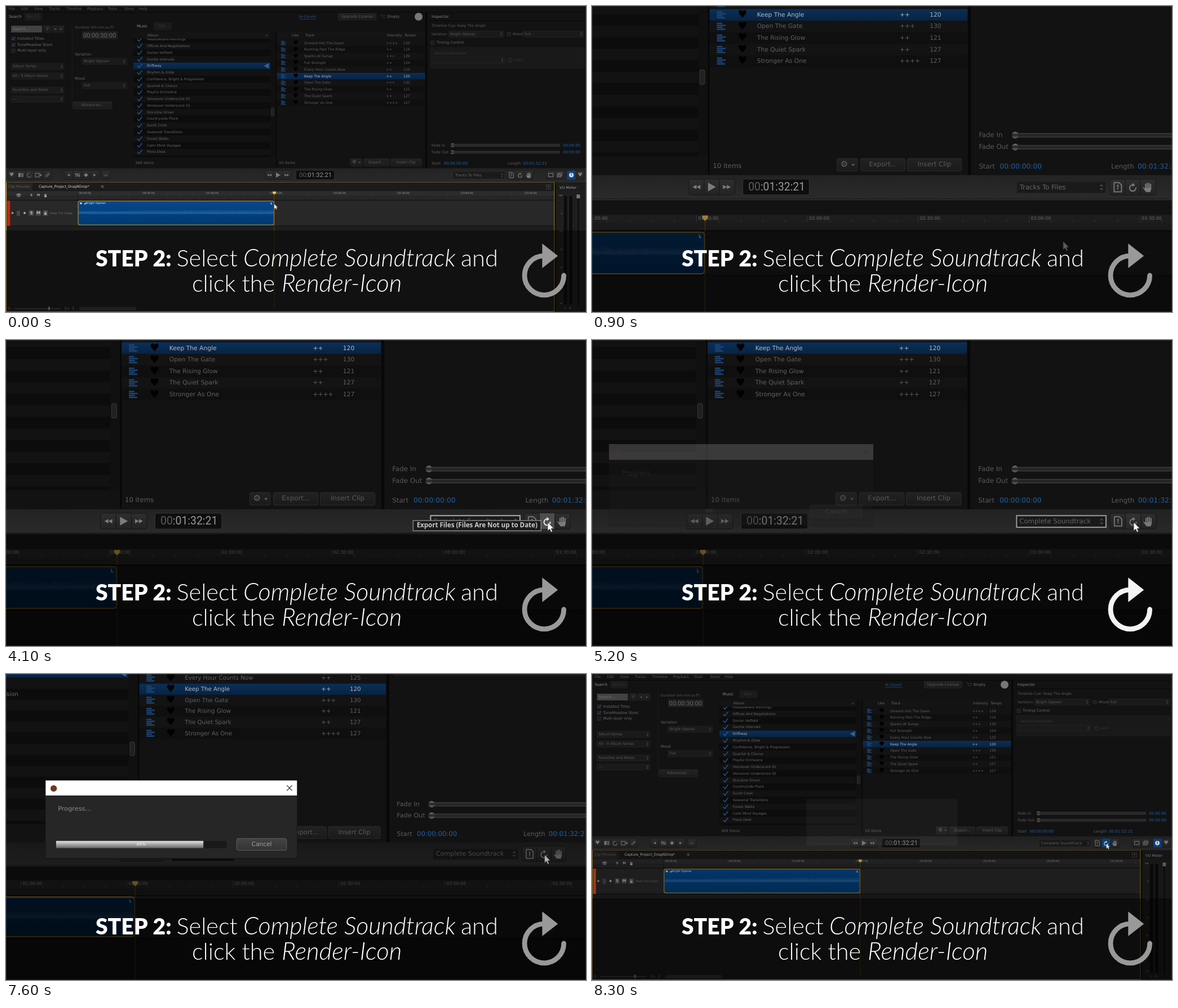
An HTML page with a canvas that plays this animation: 1029x544 px, repeating every 8.4 s.

```html
<!DOCTYPE html>
<html lang="en">
<head>
<meta charset="utf-8">
<title>Step 2: render the soundtrack</title>
<style>
html, body { margin: 0; width: 100%; height: 100%; overflow: hidden; background: #0d0d0d; }
canvas { display: block; width: 100vw; height: 100vh; }
</style>
</head>
<body>
<canvas id="stage" width="1029" height="544"></canvas>
<script>
const ctx = document.getElementById('stage').getContext('2d');
const LOOP = 8400, ZOOM = 1.75;
const UI = '"DejaVu Sans", sans-serif', CAPTION = 'Lato, sans-serif', DIGITS = 'Roboto, sans-serif';
const BLUE = '#215f9f', GOLD = '#c79a2b', ACTIVE = '#0b4384';

const albums = ['Offices And Negotiations', 'Dorian Velfield', 'Gentle Intervals', 'Driftway',
  'Rhythm & Glide', 'Confidence, Bright & Progression', 'Quartet & Chorus', 'Playful Orchestra',
  'Voiceover Underscore 01', 'Voiceover Underscore 02', 'Storyline Driver', 'Countryside Pluck',
  'Sunlit Crest', 'Seasonal Transitions', 'Forest Walks', 'Calm Mind Voyages', 'Press Desk'];
const tracks = [['Onward Into The Dawn', 4, 134], ['Running Past The Ridge', 2, 116],
  ['Sparks At Sunup', 3, 130], ['Full Strength', 2, 124], ['Every Hour Counts Now', 2, 125],
  ['Keep The Angle', 2, 120], ['Open The Gate', 3, 130], ['The Rising Glow', 2, 121],
  ['The Quiet Spark', 2, 127], ['Stronger As One', 4, 127]];
const cursorPath = [[0, 476, 352], [900, 841, 356], [1500, 882, 304], [1800, 882, 304],
  [2000, 865.7, 311.4], [2300, 866, 314], [3000, 866, 314], [3800, 912.6, 301.7]];
const progressPath = [[5900, 0], [6500, .54], [6800, .66], [7200, .79], [7900, .92], [8300, 1]];

let t = 0;

// Timing
const clamp = u => Math.min(1, Math.max(0, u));
const smooth = u => (u = clamp(u), u * u * (3 - 2 * u));
const ramp = (from, to) => smooth((t - from) / (to - from));
const noise = n => { const v = Math.sin(n * 127.1) * 43758.5453; return v - Math.floor(v); };
function follow(path, ease) {
  let i = 0;
  while (i < path.length - 2 && t >= path[i + 1][0]) i++;
  const a = path[i], b = path[i + 1], u = ease((t - a[0]) / (b[0] - a[0]));
  return a.slice(1).map((v, k) => v + (b[k + 1] - v) * u);
}

// Drawing helpers
function text(s, x, y, color = '#686868', size = 6.15, align = 'left', font = UI, style = '') {
  ctx.font = `${style} ${size}px ${font}`;
  ctx.textAlign = align;
  ctx.textBaseline = 'middle';
  ctx.fillStyle = color;
  ctx.fillText(s, x, y);
}
const rect = (x, y, w, h, color) => { ctx.fillStyle = color; ctx.fillRect(x, y, w, h); };
const frame = (x, y, w, h, color, width = .6) => {
  ctx.strokeStyle = color; ctx.lineWidth = width; ctx.strokeRect(x, y, w, h);
};
function round(x, y, w, h, r, fill, stroke, width = .6) {
  ctx.beginPath(); ctx.roundRect(x, y, w, h, r);
  if (fill) { ctx.fillStyle = fill; ctx.fill(); }
  if (stroke) { ctx.strokeStyle = stroke; ctx.lineWidth = width; ctx.stroke(); }
}
function dot(x, y, r, color) {
  ctx.beginPath(); ctx.arc(x, y, r, 0, 7); ctx.fillStyle = color; ctx.fill();
}
function shape(points, color) {
  ctx.beginPath(); points.forEach(p => ctx.lineTo(...p)); ctx.closePath();
  ctx.fillStyle = color; ctx.fill();
}
function line(points, color, width) {
  ctx.beginPath(); points.forEach(p => ctx.lineTo(...p));
  ctx.strokeStyle = color; ctx.lineWidth = width; ctx.stroke();
}
function vertical(y0, y1, ...colors) {
  const g = ctx.createLinearGradient(0, y0, 0, y1);
  colors.forEach((c, i) => g.addColorStop(i / (colors.length - 1), c));
  return g;
}
const selection = y => vertical(y - 6, y + 6, '#0a2f59', '#072342');
const triangle = (x, y, s, color) => shape([[x - s, y - Math.abs(s) * 1.1], [x + s, y], [x - s, y + Math.abs(s) * 1.1]], color);
const tick = (x, y, s = 1) => line([[x - 4 * s, y], [x - 1 * s, y + 3.3 * s], [x + 4.5 * s, y - 4 * s]], BLUE, 1.3 * s);
function button(label, x, y, w, h, color = '#5a5a5a') {
  round(x, y, w, h, 2, vertical(y, y + h, '#222', '#1a1a1a'), '#2a2a2a');
  text(label, x + w / 2, y + h / 2, color, 6.75, 'center');
}
function combo(label, x, y, w, color = '#5a5a5a', size = 6.4, h = 11) {
  rect(x, y, w, h, '#1a1a1a'); frame(x, y, w, h, '#272727');
  text(label, x + 3, y + h / 2 + .2, color, size);
  for (const d of [-1, 1]) {
    const m = y + h / 2 + d;
    shape([[x + w - 6.5, m], [x + w - 2.5, m], [x + w - 4.5, m + d * 2.3]], '#444');
  }
}
function checkbox(label, x, y, on, color) {
  rect(x - 3, y - 3, 6, 6, '#1c1c1c'); frame(x - 3, y - 3, 6, 6, '#3a3a3a');
  if (on) tick(x, y, .7);
  text(label, x + 7, y, color, 6.6);
}
function cells(x, y, w, h, count) {
  round(x, y, w, h, 2, vertical(y, y + h, '#2e2e2e', '#232323'), '#171717');
  for (let i = 1; i < count; i++) rect(x + w * i / count - .3, y, .6, h, '#171717');
}
function refreshIcon(x, y, r, color, width) {
  ctx.beginPath(); ctx.arc(x, y, r, 0, Math.PI * 1.5);
  ctx.strokeStyle = color; ctx.lineWidth = width; ctx.lineCap = 'round'; ctx.stroke(); ctx.lineCap = 'butt';
  shape([[x - r * .1, y - r * 1.63], [x + r * .7, y - r], [x - r * .1, y - r * .37]], color);
}

function libraryPanels() {
  rect(0, 0, 1029, 289, '#121212');
  'File 5,Edit 27,View 50,Tracks 76,Timeline 107,Playback 144,Tools 181,Store 210,Help 236'.split(',')
    .forEach(m => { const [s, x] = m.split(' '); text(s, +x, 5.5, '#555', 6.4); });
  rect(0, 11, 1029, 1, '#090909');
  text('Search', 5, 19, '#8a8a8a', 6.6);
  rect(33, 12, 31, 14, '#1b1b1b'); text('Bin (1)', 37, 19, '#383838', 6.6);
  text('Hi Corvin!', 520, 19.5, BLUE, 6.2); rect(520, 23, 30, .6, BLUE);
  button('Upgrade License', 589, 13, 68, 12);
  line([[664, 15], [666, 15], [668, 21], [673, 21], [674, 17], [667, 17]], '#2c2c2c', 1);
  text('Empty', 677, 19, '#777', 6.6);
  dot(732, 19, 7, '#777');

  rect(1, 26, 224, 262, '#121212');
  rect(9, 35, 55, 12, '#424242'); text('Search...', 12, 41, '#777', 6.6);
  for (const [x, s] of [[67, '⚲'], [82, '◂'], [93, '▸']]) button(s, x, 35, x < 80 ? 13 : 10, 12);
  checkbox('Installed Titles', 13, 58, true);
  checkbox('TuneMeadow Store', 13, 69, true);
  checkbox('Multi-layer only', 13, 79.5, false);
  combo('Album Series', 9, 102, 94); combo('All - 9 Album Series', 9, 119, 94);
  combo('Favorites and Notes', 9, 144, 94); combo('---', 9, 160, 94);
  rect(117, 28, 1, 156, '#1b1b1b');
  text('Duration (hh:mm:ss:ff)', 122, 38, '#555', 6.1);
  rect(135, 45, 63, 14, '#1f1f1f'); text('00:00:30:00', 166, 52.3, '#666', 11.2, 'center', DIGITS);
  text('Variation', 122, 86, '#666', 6.6); combo('Bright Opener', 135, 93, 79);
  text('Mood', 122, 129, '#666', 6.6); combo('Full', 135, 136, 79);
  button('Advanced...', 119, 170, 69, 13);

  text('Music', 232, 36, '#888', 6.8);
  rect(262, 29, 32, 14, '#1b1b1b'); text('SFX', 270, 36, '#383838', 6.8);
  rect(226, 46, 243, 223, '#0c0c0c'); rect(226, 46, 243, 12, '#141414');
  ctx.save();
  ctx.beginPath(); ctx.rect(226, 58, 243, 211); ctx.clip();
  tick(237, 59.5); text('Meadowland Mornings', 250, 59.5);
  albums.forEach((name, i) => {
    const y = 71.2 + 11.77 * i, chosen = i === 3;
    rect(226, y - 5.9, 243, 11.8, chosen ? selection(y) : i % 2 ? '#0c0c0c' : '#121212');
    tick(237, y); text(name, 250, y + .2, chosen ? '#b8b8b8' : '#686868');
    if (chosen) triangle(462, y, -4.5, '#34618e');
  });
  ctx.restore();
  text('Album', 251, 52.3); shape([[460, 53.5], [465, 53.5], [462.5, 50.5]], '#3a3a3a');
  rect(469, 46, 10, 223, '#101010'); round(470.5, 181, 5, 15, 2, '#202020', '#3a3a3a');
  text('369 items', 229, 279.4, '#5e5e5e', 6.7);

  rect(479, 46, 1.6, 242, '#070707');
  rect(480.6, 46, 262.8, 223, '#121212'); rect(480.6, 46, 262.8, 12, '#141414');
  [['Like', 507], ['Track', 531], ['Intensity', 676], ['Tempo', 707]].forEach(([s, x]) => text(s, x, 52.3));
  tracks.forEach(([name, level, tempo], i) => {
    const y = 65.8 + 11.8 * i, chosen = i === 5, ink = chosen ? '#b8b8b8' : '#606060';
    rect(480.6, y - 5.9, 262.8, 11.8, chosen ? selection(y) : i % 2 ? '#0f0f0f' : '#131313');
    [5.5, 9, 6, 8.5].forEach((w, k) => rect(488, y - 3.8 + k * 2, w, 1.4, '#1c4678'));
    text('♥', 514, y + .3, '#000', 11, 'center');
    text(name, 529, y + .2, ink); text('+'.repeat(level), 674.5, y + .2, ink); text(tempo, 705, y + .2, ink);
  });
  rect(480.6, 268.8, 264, 20, '#121212');
  text('10 items', 484, 279.4, '#5e5e5e', 6.7);
  button('', 610.5, 271.4, 21, 13); text('⚙', 618, 278, '#666', 8.5, 'center');
  shape([[625, 277], [629, 277], [627, 279.5]], '#555');
  button('Export...', 634.5, 271.4, 45.5, 13); button('Insert Clip', 682, 271.4, 55.5, 13);

  rect(744, 11, 3, 278, '#080808');
  text('Inspector', 755, 19, '#888', 6.6);
  rect(747, 26, 282, 1, '#090909');
  text('Timeline Cue: Keep The Angle', 755, 35.3, '#5a5a5a', 6.4);
  text('Variation', 755, 50, '#5a5a5a', 6.2); combo('Bright Opener', 785, 44.5, 98);
  checkbox('Mood', 892, 50, false, '#5a5a5a'); combo('Full', 917, 44.5, 108);
  checkbox('Timing Control', 757, 65.5, false);
  rect(752, 73, 275, 38, '#191919');
  text('Section Keyframe', 760, 84, '#383838', 6.4);
  combo('', 757, 91, 128); checkbox('Lock:', 895, 96.5, false, '#383838');
  for (const [label, y] of [['Fade In', 247.8], ['Fade Out', 260]]) {
    text(label, 755, y, '#5a5a5a', 6.75);
    rect(789, y - 2.2, 194, 4, '#262626'); rect(789, y - 2.2, 194, .6, '#444'); rect(789, y + 1.6, 194, .6, '#444');
    dot(792.2, y - .2, 3.4, vertical(y - 4, y + 3, '#888', '#222', '#666'));
    text('00:00:00', 988, y, BLUE, 6.9);
  }
  text('Start', 755, 280, '#5a5a5a', 6.75); text('00:00:00:00', 776.5, 280, BLUE, 7);
  text('Length', 890, 280, '#5a5a5a', 6.75); text('00:01:32:21', 917, 280, BLUE, 7);
}

function toolbar() {
  rect(0, 288.5, 1029, 25, vertical(289, 313, '#232323', '#2a2a2a'));
  const y = 292.6, h = 16, m = 300.6, ink = '#7c7c7c';
  const glyphs = (s, x, step) => [...s].forEach((g, i) => text(g, x + i * step, m, ink, 9.5, 'center'));
  cells(3, y, 78, h, 5); glyphs('♥', 10, 0);
  rect(22, 297, 4, 7, ink); rect(27, 297, 4, 7, '#5c5c5c');
  ctx.beginPath(); ctx.arc(41, m + .5, 3.5, 0, 5); ctx.strokeStyle = ink; ctx.lineWidth = 1; ctx.stroke();
  frame(52, 297.5, 7, 6.5, ink, 1); triangle(61, m, -2, ink);
  line([[69.5, 303.5], [75, 297.5], [76.5, 299], [72, 304]], '#606060', 1.3);
  cells(103, y, 62, h, 4); glyphs('◂', 111, 0); glyphs('◆▸', 142, 15.5);
  for (const k of [0, 1, 2]) { rect(123.5 + 3 * k, 297, 1, 7, ink); rect(122.5 + 3 * k, 298 + k * 1.6, 3, 1.6, ink); }
  cells(169, y, 16, h, 1); rect(173, 299, 8, 4, '#3c3c3c');

  cells(459.4, y, 46.8, h, 3);
  for (const x of [465.2, 469.2]) triangle(x, m, -2, ink);
  triangle(483, m, 4, ink);
  for (const x of [496.2, 500.2]) triangle(x, m, 2, ink);
  round(514.5, 292.6, 67.7, 16, 1.5, '#0e0e0e', '#333');
  text('00', 520, m + .4, '#5c5c5c', 11.1, 'left', DIGITS);
  const hours = ctx.measureText('00').width;
  text(':01:32:21', 520 + hours, m + .4, '#999', 11.1, 'left', DIGITS);

  combo(t < 2500 ? 'Tracks To Files' : 'Complete Soundtrack', 793.7, 294.9, 90.9, '#666', 6.7, 12);
  const glow = ramp(1400, 1800) - .4 * ramp(3000, 3800) - .6 * ramp(5100, 5600);
  ctx.globalAlpha = clamp(glow);
  frame(793.9, 295, 90.6, 11.8, '#fff', 1.2);
  ctx.globalAlpha = 1;

  cells(888.6, y, 46.8, h, 3);
  const lit = ramp(3700, 4000) - ramp(4900, 5300);
  if (lit > 0) { ctx.globalAlpha = lit; rect(904.5, y, 15, h, '#4d4d4d'); ctx.globalAlpha = 1; }
  const pressed = t >= 8100;
  if (pressed) rect(904.5, y, 15, h, ACTIVE);
  line([[893, 296], [898, 296], [900.5, 298.5], [900.5, 305.5], [893, 305.5], [893, 296]], ink, 1);
  text('!', 896.8, 301.3, ink, 6.5, 'center', UI, 'bold');
  refreshIcon(912, 301.6, 3.2, lit > .5 || pressed ? '#eee' : ink, 1.1);
  for (const k of [0, 1, 2, 3]) rect(924.5 + 1.7 * k, 296.4 + (k === 0 || k === 3 ? 1 : 0), 1.2, 6, ink);
  shape([[921.8, 300.6], [924.5, 302], [931, 301], [930, 305.8], [925.5, 305.8]], ink);

  cells(958, y, 33, h, 2); frame(962.5, 297.5, 8, 6, ink, 1);
  frame(978, 299, 6, 5, ink, 1); frame(980, 297, 6, 5, ink, 1);
  cells(995, y, 31, h, 2); rect(995.5, y, 15, h, ACTIVE);
  dot(1003, m, 4, '#ddd'); text('i', 1003, m + .2, ACTIVE, 6.5, 'center', UI, 'bold');
  text('♥', 1018.5, m, ink, 9.5, 'center');
}

function timeline() {
  rect(0, 313, 1029, 231, '#1e1e1e');
  rect(0, 314, 973, 15, '#1b1b1b');
  rect(1, 315, 46, 13, '#252525'); text('Clip Preview', 4, 321.5, '#606060', 6.3);
  text('Capture_Project_DragNDrop*', 58, 321.5, '#d8d8d8', 6.2);
  text('⊠', 171, 321.5, '#777', 6.5, 'center');
  frame(958.5, 318, 8, 7.5, '#555'); text('+', 962.5, 321.7, '#777', 6.5, 'center');
  rect(1, 329, 972, 8.5, '#2c2c2c'); rect(1, 337.5, 972, 7.5, '#272727'); rect(1, 344.6, 972, 1, '#111');
  for (let x = 128, i = 0; x < 970; x += 22.6, i++) rect(x, i % 5 ? 334 : 329.5, .6, i % 5 ? 3 : 7, '#4c4c4c');
  for (let i = 0; i < 8; i++)
    text(`0${i >> 1}:${i % 2 ? 30 : '00'}:00`, 130 + 113 * i, 332.6, '#a0a0a0', 4.6);

  rect(1, 346, 972, 44.5, '#282828'); rect(1, 367.6, 972, .6, '#303030'); rect(1, 390.5, 972, 1, '#111');
  for (const k of [0, 1, 2]) shape([[18, 335 + k * 1.5], [22.5, 333 + k * 1.5], [27, 335 + k * 1.5], [22.5, 337 + k * 1.5]], k ? '#666' : '#999');
  const lock = (x, y) => { rect(x - 2, y - .5, 4, 3.3, '#aaa'); frame(x - 1.2, y - 2.6, 2.4, 2.4, '#aaa', .8); };
  for (const [s, x] of [['S', 45], ['M', 57.5]]) {
    text(s, x, 337, '#aaa', 5.6, 'center', UI, 'bold');
    round(x - 4.5, 363.5, 9, 9.5, 1, '#444'); text(s, x, 368.5, '#bbb', 7, 'center', UI, 'bold');
  }
  lock(70, 337); round(65.5, 363.5, 9, 9.5, 1, '#444'); lock(70, 368.5);
  rect(2, 346, 5.3, 45, t < 8000 ? '#c9230e' : '#d2491c');
  triangle(12, 368, 2, '#aaa'); rect(19, 364, 6, 9, '#444'); dot(33, 368, 2, '#aaa');
  text('Keep The Angle', 78, 368.3, '#6a6a6a', 5.1);
  rect(127, 329, .7, 62, '#111');

  round(128, 346.8, 347.5, 42.4, 3, vertical(347, 389, '#06478a', '#004180', '#003970'), GOLD, 1.1);
  for (let x = 129; x < 474; x += .6) {
    const loud = x < 217 ? 2.6 : x < 358 ? 4.2 : 5;
    const up = loud * (.35 + .65 * noise(x));
    rect(x, 366.5 - up, .6, up + 2 + 1.5 * noise(x + 7), '#1f5690');
  }
  rect(129, 366, 346, 4, 'rgba(56,112,172,.35)');
  dot(133, 350.8, 1.8, '#ddd'); text('◢', 138, 350.8, '#ddd', 4.5);
  text('Bright Opener', 142, 350.8, '#eee', 5);
  text('♫ Full', 132, 383.5, '#1c3a5c', 5);
  shape([[469.8, 348.3], [472.2, 352.8], [469.8, 352.8]], '#ddd');
  rect(475.6, 335, .8, 202, '#5f4c1c');
  shape([[473, 329.8], [479, 329.8], [479, 332.2], [476, 335.4], [473, 332.2]], '#f0c348');

  text('⚲-', 3, 538, '#888', 6.5); rect(15, 537, 82, 2, '#444'); round(75, 534.5, 3, 6, 1, '#999');
  text('⚲+', 103, 538, '#888', 6.5); text('⚲', 117, 538, '#888', 6.5);
  round(130, 535, 101, 6, 3, '#3a3a3a');
  frame(.6, 313.2, 972.4, 230, GOLD, 1);

  rect(973.5, 313, 2.5, 231, '#0b0b0b');
  rect(976, 314, 53, 15, '#1c1c1c'); text('VU Meter', 982, 323, '#a0a0a0', 6.5);
  for (const x of [989, 998.5]) { rect(x, 337, 7, 194, '#0c0c0c'); frame(x, 337, 7, 194, '#2d2d2d'); }
  ['0dB', '-6', '-12', '-18', '-24', '-36', '-60'].forEach((s, i) => text(s, 987.5, 337 + i * 32, '#888', 3.6, 'right'));
  rect(1014.3, 334, 2, 200, '#0c0c0c'); round(1012.3, 335, 6, 7, 1, '#777');
  text('L', 992, 538, '#888', 5, 'center'); text('R', 1001, 538, '#888', 5, 'center');
}

function popups() {
  if (t >= 1700 && t < 2500) {
    rect(793.7, 308.2, 101.7, 35, '#2a2a2a'); frame(793.7, 308.2, 101.7, 35, '#606060');
    rect(794.2, 308.6, 100.8, 10.9, '#123a76');
    ['Complete Soundtrack', 'Tracks To Files', 'Layers To Files'].forEach((s, i) =>
      text(s, 806.3, 314 + 11.3 * i, i ? '#8a8a8a' : '#e8e8e8', 7.05));
    line([[798.2, 325.5], [799.8, 328], [802.8, 321.8]], '#ccc', 1);
  }
  if (t >= 4100 && t < 4600) {
    rect(776.2, 300, 129.6, 10.4, '#1b1b1b'); frame(776.2, 300, 129.6, 10.4, '#8c8c8c', .8);
    text('Export Files (Files Are Not up to Date)', 841, 305.4, '#ccc', 6.6, 'center', '"Open Sans", sans-serif', 'bold');
  }
}

function dialog() {
  if (t < 5100) return;
  const [done] = follow(progressPath, clamp);
  ctx.save();
  ctx.translate(380.6, 222.3); ctx.scale(1 / ZOOM, 1 / ZOOM);
  // A faint pane stays behind once the window has gone.
  if (t >= 7900) rect(0, 0, 469, 145, 'rgba(255,255,255,.035)');
  ctx.globalAlpha = clamp(ramp(5100, 5500) - ramp(7900, 8250));
  rect(-1, -1, 471, 148, '#161616');
  rect(0, 0, 469, 145, '#262626'); rect(0, 0, 469, 28, '#fff');
  dot(15, 15, 6, '#6d3a20');
  line([[450, 9], [460, 19]], '#222', 1.2); line([[460, 9], [450, 19]], '#222', 1.2);
  text('Progress...', 23, 53, '#8c8c8c', 11.9);
  rect(19.5, 113, 318, 13.5, '#191919');
  rect(19.5, 113, 318 * done, 13.5, vertical(113, 126.5, '#e4e4e4', '#a5a5a5', '#666'));
  text(Math.round(done * 100) + '%', 178.5, 120, '#eee', 8, 'center');
  round(356.5, 108.5, 93, 22, 3, vertical(108, 131, '#444', '#333'), '#606060', 1);
  text('Cancel', 403, 120, '#a0a0a0', 11.2, 'center');
  ctx.restore();
}

function cursor() {
  const [x, y] = follow(cursorPath, smooth);
  const outline = [[0, 0], [0, 8.6], [2, 6.9], [3.4, 10], [4.8, 9.3], [3.4, 6.4], [6, 6.2]].map(([a, b]) => [x + a, y + b]);
  shape(outline, '#fff'); line([...outline, outline[0]], '#333', .4);
}

function caption() {
  rect(0, 399, 1029, 145, 'rgba(0,0,0,.45)');
  const words = (s, x, y, size, style) => {
    ctx.font = `${style} ${size}px ${CAPTION}`; ctx.textAlign = 'left'; ctx.textBaseline = 'alphabetic';
    ctx.fillStyle = '#fff'; ctx.fillText(s, x, y);
  };
  words('STEP 2:', 159, 463, 39, '900');
  words('Select', 302.5, 463, 41.5, '300');
  words('Complete Soundtrack', 421, 463, 43.1, 'italic 300');
  words('and', 807, 463, 41.5, '300');
  words('click the', 330, 508, 41.5, '300');
  words('Render-Icon', 489, 508, 43.9, 'italic 300');
  const shade = 153 + 102 * (ramp(4200, 4600) - ramp(5100, 5600));
  refreshIcon(954.8, 479, 34.8, `rgb(${shade},${shade},${shade})`, 8.8);
}

function draw(now) {
  t = Math.floor(now % LOOP / 100) * 100;
  const zoom = ramp(0, 965) - ramp(7410, 8310);
  const scale = 1 + (ZOOM - 1) * zoom;
  ctx.setTransform(scale, 0, 0, scale, -636 * zoom, -204 * zoom);
  libraryPanels();
  timeline();
  toolbar();
  const cursorOnTop = t >= 1000 && t < 5100 || t >= 8100;
  if (!cursorOnTop) cursor();
  rect(0, 312.5, 1029, 232, `rgba(0,0,0,${.58 * (ramp(0, 1600) - ramp(7700, 8800))})`);
  rect(0, 288.5, 1029, 24, `rgba(0,0,0,${.3 * (ramp(5100, 5700) - ramp(7700, 8600))})`);
  popups();
  dialog();
  if (cursorOnTop) cursor();
  ctx.setTransform(1, 0, 0, 1, 0, 0);
  caption();
  frame(.5, .5, 1028, 543, 'rgba(255,255,255,.1)', 1);
}

const start = performance.now();
function tickFrame() {
  draw(performance.now() - start);
  requestAnimationFrame(tickFrame);
}
tickFrame();
</script>
</body>
</html>
```
